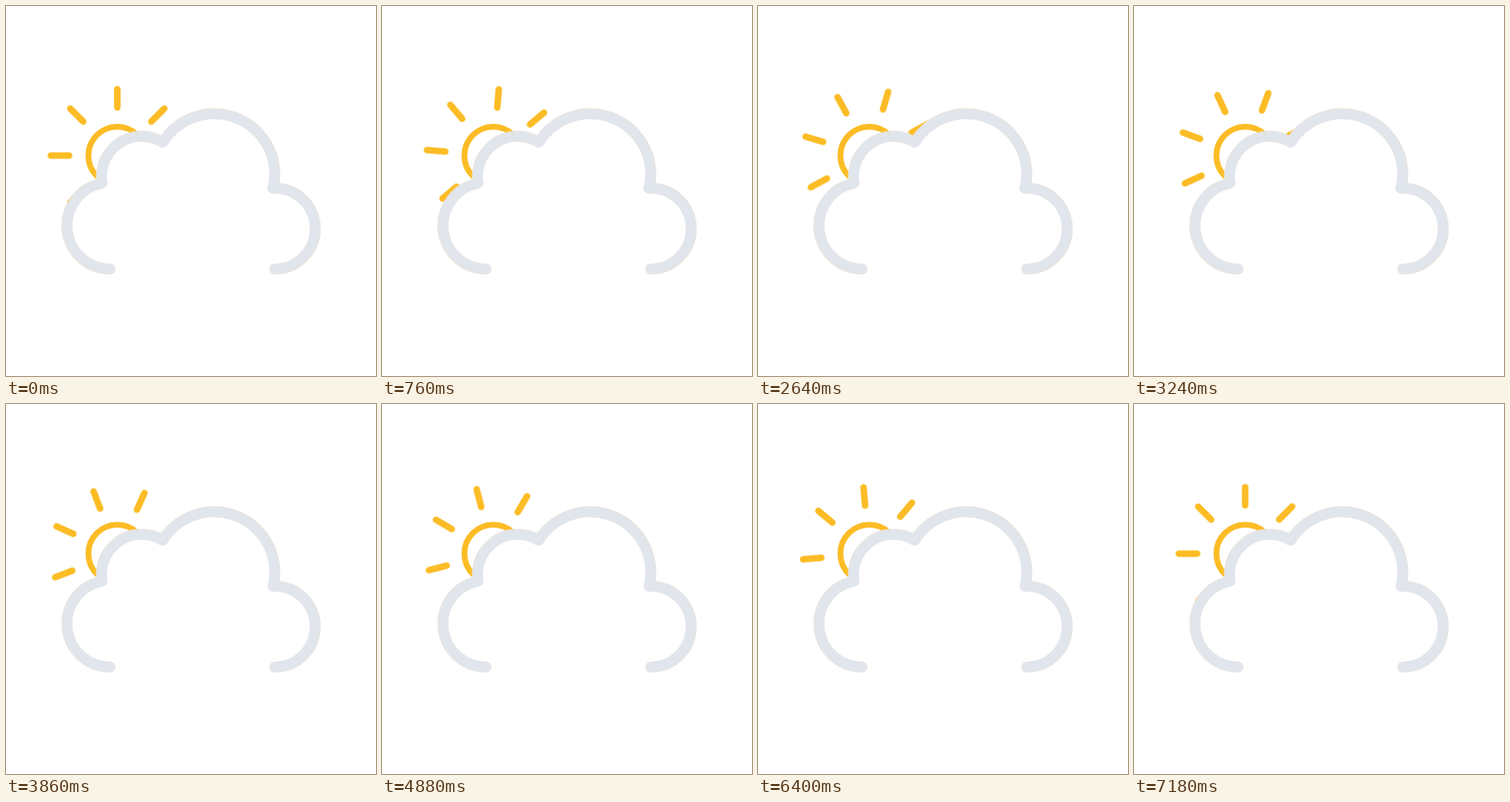
An HTML page that plays this animation: 500x500 px, repeating every 7200 ms.

```html
<!DOCTYPE html>
<html lang="en">
<head>
<meta charset="utf-8">
<title>Partly cloudy</title>
<style>
  html, body { margin: 0; width: 100%; height: 100%; overflow: hidden; background: #fff; }
  svg { display: block; width: 100vw; height: 100vh; }
  .sun { fill: none; stroke: #fcbc25; stroke-linecap: round; }
  .rays { animation: turn 7.2s linear infinite; }
  .cloud { stroke-linecap: round; stroke-linejoin: round; }
  .rim { fill: #fff; stroke: #ece3d1; stroke-width: 15; }
  .body { fill: none; stroke: #e1e5ec; stroke-width: 14.2; }
  /* The rays repeat every 45 degrees, so one step loops seamlessly. */
  @keyframes turn { to { transform: rotate(45deg); } }
</style>
</head>
<body>
<svg viewBox="0 0 512 512">
  <defs>
    <path id="cloud" d="M372 364a56 56 0 0 0 0-112c-.85 0-1.68.09-2.53.13A83.9 83.9 0 0 0 372 232a84 84 0 0 0-155.29-43.47A55.81 55.81 0 0 0 188 180a56 56 0 0 0-56 56 56.56 56.56 0 0 0 .8 9.08A60 60 0 0 0 144 364"/>
    <path id="pair" d="M0-66.64V-92M0 66.64V92"/>
  </defs>
  <g class="sun" transform="translate(154 207)">
    <circle r="40" stroke-width="8"/>
    <g class="rays" stroke-width="9">
      <use href="#pair"/>
      <use href="#pair" transform="rotate(45)"/>
      <use href="#pair" transform="rotate(90)"/>
      <use href="#pair" transform="rotate(135)"/>
    </g>
  </g>
  <g class="cloud">
    <use class="rim" href="#cloud"/>
    <use class="body" href="#cloud" transform="translate(256 300) scale(.9975) translate(-256 -300)"/>
  </g>
</svg>
</body>
</html>
```
